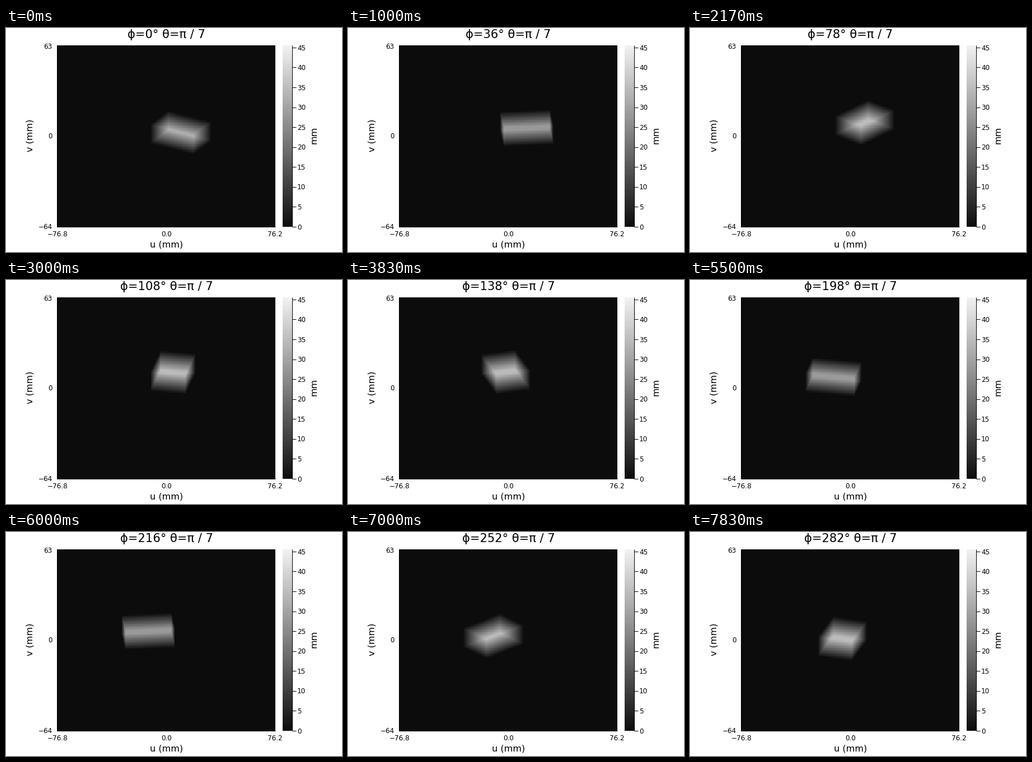
These frames come from a looping animation (600 px wide and 400 px high, 8000 ms). A matplotlib script:

```python
import numpy as np
import matplotlib.pyplot as plt
from matplotlib.animation import FuncAnimation
from matplotlib.colors import LinearSegmentedColormap

W, H, DPI = 600, 400, 100
FRAMES, INTERVAL = 48, 166.5    # six steps a second, on a 10 ms clock
STEP = 6                        # degrees per frame

# Rotated cuboid, in mm
CENTER = (10, 8, 6)
WIDTH = (35, 25, 15)
TURN = np.pi / 6
THETA = np.pi / 7
PEAK = np.linalg.norm(WIDTH)    # longest possible chord

# Plot area and colour bar, in pixels
LEFT, RIGHT, TOP, BOTTOM = 91, 481, 31, 355
BAR_L, BAR_R = 494, 511
TICK, LABEL, TITLE = 12, 16, 21

u, v = np.meshgrid((np.arange(256) - 128) * 0.6, 63.0 - np.arange(128))
grays = LinearSegmentedColormap.from_list("soft", ["0.05", "0.95"])


def rotate(x, y):
    c, s = np.cos(TURN), np.sin(TURN)
    return c * x + s * y, c * y - s * x


def project(phi):
    """Chord lengths of parallel rays through the cuboid."""
    c, s = np.cos(phi), np.sin(phi)
    ct, st = np.cos(THETA), np.sin(THETA)
    x = u * c + v * s * st - CENTER[0]
    y = u * s - v * c * st - CENTER[1]
    z = v * ct - CENTER[2]
    points = (*rotate(x, y), z)
    rays = (*rotate(-s * ct, c * ct), st)
    enter = np.full(u.shape, -np.inf)
    leave = np.full(u.shape, np.inf)
    for p, e, w in zip(points, rays, WIDTH):
        e = e if abs(e) > 1e-9 else 1e-9
        mid, half = -p / e, w / 2 / abs(e)
        enter = np.maximum(enter, mid - half)
        leave = np.minimum(leave, mid + half)
    return np.maximum(leave - enter, 0)


plt.rcParams["font.family"] = "DejaVu Sans"
fig = plt.figure(figsize=(W / DPI, H / DPI), dpi=DPI, facecolor="white")
ax = fig.add_axes([0, 0, 1, 1])


def text(x, y, s, size, ha="center", **kw):
    return ax.text(x, y, s, fontsize=size * 72 / DPI, ha=ha, va="baseline",
                   color="black", **kw)


def line(xs, ys):
    ax.plot(xs, ys, color="black", lw=0.72, solid_capstyle="butt")


def digits(x, y, s, ha):
    """Tick label with its digits centred on y."""
    text(x, y + 0.365 * TICK, s, TICK, ha)


def heat(data, left, right, peak):
    return ax.imshow(data, cmap=grays, vmin=0, vmax=peak, aspect="auto",
                     interpolation="nearest",
                     extent=(left, right, BOTTOM, TOP))


image = heat(project(0), LEFT, RIGHT, PEAK)
heat(np.linspace(1, 0, 256)[:, None], BAR_L, BAR_R, 1)

# Whole coordinates snap to the pixel on their right or below
line([LEFT, RIGHT], [BOTTOM, BOTTOM])
line([LEFT, LEFT], [TOP, BOTTOM])
line([BAR_R, BAR_R], [TOP, BOTTOM])

for x, s in ((92, "−76.8"), (287, "0.0"), (480.5, "76.2")):
    digits(x, 367.3, s, "center")
for y, s in ((32.5, "63"), (192.5, "0"), (354.5, "−64")):
    digits(82.5, y, s, "right")
for value in range(0, 50, 5):
    y = BOTTOM - value / PEAK * (BOTTOM - TOP)
    line([BAR_R, BAR_R + 7], [y, y])
    digits(BAR_R + 9, y + 0.2, str(value), "left")

text(286.5, 392, "u (mm)", LABEL)
side = dict(rotation=90, rotation_mode="anchor")
text(47.5, 191.8, "v (mm)", LABEL, **side)
text(554.5, 191.8, "mm", LABEL, **side)
title = text(286.5, 18, "", TITLE)

ax.set_xlim(0, W)
ax.set_ylim(H, 0)
ax.axis("off")


def update(i):
    angle = i * STEP
    image.set_data(project(np.radians(angle)))
    title.set_text(f"ϕ={angle}° θ=π / 7")
    return image, title


anim = FuncAnimation(fig, update, frames=FRAMES, interval=INTERVAL,
                     repeat=True, repeat_delay=0)
plt.show()
```
